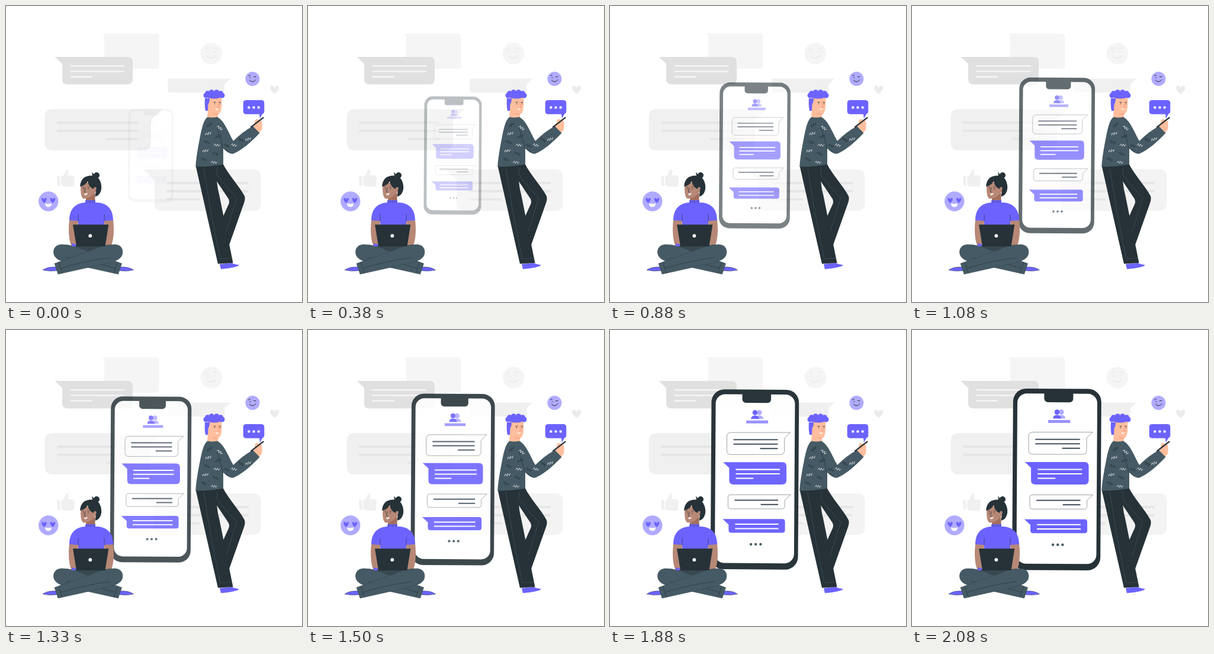
These frames come from a looping animation (500x500 px, 2120 ms). An HTML page:

```html
<!DOCTYPE html>
<html lang="en">
<head>
<meta charset="utf-8">
<title>Chat</title>
<style>
  html, body { margin: 0; width: 100%; height: 100%; overflow: hidden; background: #fff; }
  svg { display: block; width: 100vw; height: 100vh; }
  .line { fill: none; stroke: #263238; stroke-linecap: round; stroke-linejoin: round; }
  .dots { fill: none; stroke-linecap: round; stroke-dasharray: 0 8.2; stroke-width: 4.4; }
  .dark { fill: #263238; }
  .slate { fill: #455a64; }
  .purple { fill: #6c63ff; }
  .lilac { fill: #b0abff; }
  .skin { fill: #ffbe9d; }
  .brown { fill: #b78876; }
</style>
</head>
<body>
<svg viewBox="0 0 500 500">
  <defs>
    <path id="heart" d="M0 5C-5 1-6-4-3-5Q-1-5 0-2Q1-5 3-5C6-4 5 1 0 5Z"/>
    <g id="person">
      <circle cx="245" cy="138.600" r="4.300"/>
      <path d="M238 149.500Q238.500 143.500 245 143.500T252 149.500Z"/>
    </g>
    <g id="half-torso">
      <path class="brown" d="M107 361C105 378 106 397 111 406H120L122 361Z"/>
      <path class="purple" d="M145 332H134C117 333 107 343 107 362L122 363V372H145Z"/>
      <path class="line" stroke-width=".6" d="M122 363V352"/>
    </g>
    <g id="leg">
      <path class="purple" stroke="#263238" stroke-width=".5" d="M62 446Q70 440 86 441V447Q74 449 62 446Z"/>
      <path class="slate" stroke="#37474f" stroke-width=".6" d="M146 412Q165 403 183 403C195 403 199 412 196 421C192 430 178 433 160 437L88 453L82 435Z"/>
      <path class="line" stroke-width=".6" d="M89 433L95 451M93 443Q135 430 176 425"/>
    </g>
  </defs>

  <g id="backdrop">
    <circle cx="347" cy="80.300" r="18.300" fill="#f5f5f5"/>
    <path class="line" style="stroke:#e6e6e6" stroke-width="1.200" d="M339.500 85q7.500 6.500 15-1M336.500 73q2-2 4-1.500M351 71.500q3-1 5 1M340.500 76.500v2M352 76.500v2"/>
    <use href="#heart" transform="translate(453.700 141.500) scale(1.600 1.400)" fill="#ebebeb"/>
    <path fill="#f0f0f0" d="M86 287H91L92 303.500H87ZM93 288C98 287 99 282 101 277Q105 274 105.500 279L104.500 286H113Q117 288 115.500 296Q116 305 112 305.500L98 305L93.500 303Z"/>
  </g>

  <g id="phone">
    <g transform="rotate(.35 244.500 252.500)">
      <rect class="dark" x="170" y="99.300" width="149" height="306.400" rx="22"/>
      <rect x="177.200" y="107.500" width="135" height="287.500" rx="16" fill="#fff"/>
      <rect class="dark" x="222.500" y="102" width="49" height="20" rx="6"/>
    </g>
    <use href="#person" x="7.300" class="lilac"/>
    <use href="#person" class="purple"/>
    <rect x="230" y="152" width="37.300" height="5" fill="#9993ff"/>
    <path class="dots" stroke="#455a64" d="M238 362.800h17"/>
  </g>

  <g id="emojis">
    <circle cx="416.400" cy="123" r="12" class="lilac"/>
    <path class="line" stroke-width="1" d="M411.500 125.500Q417 131 422 124.500M409.500 118q1.500-1.500 3-1M418.500 119.500h3.500M412.500 120.500v1"/>
    <circle cx="71.700" cy="330" r="16.700" class="lilac"/>
    <use href="#heart" transform="translate(64.500 328.500) scale(.9)" class="purple"/>
    <use href="#heart" transform="translate(79 328.500) scale(.9)" class="purple"/>
    <path fill="#fff" d="M66 333.500Q71.500 335 77 333.500Q77 339.500 71.500 339.500T66 333.500Z"/>
  </g>

  <g id="woman">
    <use href="#half-torso"/>
    <use href="#half-torso" transform="translate(288) scale(-1 1)"/>
    <path fill="#a46f5e" d="M135 316H150.500V330H135Z"/>
    <path class="brown" d="M127 298C125 308 126 324 131 325.500Q143 326 152 313V298Z"/>
    <circle class="dark" cx="153" cy="286" r="5"/>
    <path class="dark" d="M125 305C126 292 133 286 146 286.500L145 280.500L150 286C161 291 163 307 160 313Q158 320 150.500 322L152.500 307Q150 303 147.500 309Q140 306 138 296Q133 304 125 305Z"/>
    <path class="line" stroke-width=".8" d="M129.500 306h2M138 306h2.500M131 308.500v1M139 308.500v1M134 307L132.500 314H134"/>
    <path fill="#fff" d="M132 317Q135.500 317.500 138 315.500Q137 320 133 319.500Z"/>
    <path class="purple" d="M134 328H151V333H134Z"/>
    <path d="M136 330.500H151" stroke="#263238" stroke-width="4" stroke-dasharray=".5 2.500"/>
    <path fill="#37474f" d="M114 404H173L164 420H122Z"/>
    <use href="#leg" transform="translate(277.500) scale(-1 1)"/>
    <use href="#leg"/>
    <path class="purple" d="M111 401L118 402.500V406H111Z"/>
    <path class="dark" d="M113 369.300H173.300L167.500 406H119Z"/>
    <circle cx="142.300" cy="388.200" r="2.900" fill="#fff"/>
  </g>

  <g id="man">
    <path class="purple" d="M361 436L381 434Q387 437 394 437.500Q390 442 363 444.500Z"/>
    <path class="dark" d="M338 268L366.500 266.500C375 284 394 304 403 321Q404.500 326 402 333L376.500 405L366 357L376.500 334Q378 330 376 326L356 296Z"/>
    <path class="dark" d="M320.500 270L351 269C357 285 355 300 360 318L383.500 434L358 435.500Z"/>
    <path class="line" style="stroke:#455a64" stroke-width=".6" d="M334 274Q345 350 362 427L381 426M357 273L356 285Q375 310 390 324L372 380"/>
    <path class="skin" d="M341 170H358V190Q348 194 340 189Z"/>
    <path class="skin" d="M341 155H364C365 168 364 180 359 182.500Q348 184 341 172Z"/>
    <path class="purple" d="M336 156H344Q344 163 341.500 166L341 177H337Q335 168 336 156Z"/>
    <g id="curls" class="purple"><ellipse cx="351.500" cy="151" rx="14" ry="5.500"/></g>
    <path class="line" stroke-width=".9" d="M351 162.500h3M360 162.500h2.500M352.500 164.500v1M361.500 164.500v1"/>
    <path class="line" style="stroke:#eb9481" stroke-width=".9" d="M358 163L360 171H357.500M350 181.500Q354 183.500 358 182.500"/>
    <path fill="#fff" d="M353 173Q357 174.500 359.500 173Q357 178 353 173Z"/>
    <path class="skin" d="M416 205L420 198Q420 191 424 191L432 194Q433.500 205 431.500 210L426 215Z"/>
    <path class="slate" d="M340.500 187.500C334 192 331 205 328 220C324 240 321 258 320.300 271.500Q344 272 367 267.500V240Q376 251 384 249.500C398 244 415 229 428.500 214.500L417 203Q400 212 384 228C376 214 368 192 356.500 187.500Q348 189.500 340.500 187.500Z"/>
    <path class="line" stroke-width=".7" d="M356 205Q363 224 366 240L376 246"/>
    <path class="line" stroke-width="2.300" d="M414 204.300L434.500 188.600"/>
  </g>

  <path class="purple" d="M406 159H431Q436.300 159 436.300 164V178Q436.300 181 433 182.500L429 190L428 182.700H406Q400.700 182.700 400.700 178V164Q400.700 159 406 159Z"/>
  <path class="dots" stroke="#fff" d="M410.300 171.400h17"/>
</svg>
<script>
const NS = 'http://www.w3.org/2000/svg';
const LOOP = 2120, STEPS = 51, STEP_MS = 1000 / 24;
const DARK = '#263238', PURPLE = '#6c63ff';
const byId = id => document.getElementById(id);
const phone = byId('phone'), backdrop = byId('backdrop'), man = byId('man');

function add(parent, tag, attrs) {
  const el = document.createElementNS(NS, tag);
  for (const key in attrs) el.setAttribute(key, attrs[key]);
  parent.append(el);
}

// Tail, corners and text rows all follow from the size; side is -1 for a tail on the left.
function bubble(parent, x, y, w, h, side, rows, paint, ink) {
  const dir = Math.sign(side), tail = side * w * .105;
  const r = h * (rows ? .19 : .09), k = dir * r;
  const near = dir > 0 ? x + w : x, far = dir > 0 ? x : x + w;
  add(parent, 'path', {
    d: `M${near + tail} ${y}H${far + k}q${-k} 0 ${-k} ${r}V${y + h - r}q0 ${r} ${k} ${r}` +
       `H${near - k}q${k} 0 ${k} ${-r}V${y + Math.abs(tail) * .95}Z`,
    ...paint
  });

  const length = w * .77, gap = w * .077;
  const left = x + (w - length) / 2, middle = y + h / 2 + w * .01;
  for (let i = 0; i < rows; i++) {
    const short = i > 0 && i === rows - 1 && ink.short !== false;
    const size = short ? length * .4 : length;
    const from = short && dir > 0 ? left + length - size : left;
    add(parent, 'path', {
      d: `M${from} ${middle + (i - (rows - 1) / 2) * gap}h${size}`,
      stroke: ink.color, 'stroke-width': w * .0215
    });
  }
}

const gray = level => ({ fill: `rgb(${level},${level},${level})` });
const grayInk = level => ({ color: gray(level).fill });
bubble(backdrop, 166, 46.5, 92.5, 59.5, -.4, 0, gray(245));
bubble(backdrop, 95, 86, 119, 46.5, -1, 3, gray(224), grayInk(245));
bubble(backdrop, 273.5, 122.7, 95.5, 23.5, 1, 0, gray(240));
bubble(backdrop, 65.5, 174.3, 179.5, 69.5, 1, 3, gray(240), grayInk(230));
bubble(backdrop, 251, 276, 179.5, 70, -1, 3, gray(243), grayInk(230));

const outline = { fill: '#fff', stroke: DARK, 'stroke-width': .45 };
const solid = { fill: PURPLE };
bubble(phone, 197, 172.5, 98, 37.5, 1, 3, outline, { color: '#455060' });
bubble(phone, 201, 223, 97.5, 38, -1, 3, solid, { color: '#fff' });
bubble(phone, 199, 278.5, 96.5, 24, 1, 2, outline, { color: '#455060' });
bubble(phone, 200, 319.7, 96, 23.5, -1, 2, solid, { color: '#fff', short: false });

for (let i = 0; i <= 5; i++) {
  const a = Math.PI * (1 + i / 5);
  add(byId('curls'), 'circle', { cx: 351.5 + 13.5 * Math.cos(a), cy: 151 + 5.5 * Math.sin(a), r: 4.5 });
}

// Knitted zigzags: two columns down the jumper, then a row along the sleeve.
let seed = 7;
const random = () => (seed = seed * 16807 % 2147483647) / 2147483647;
function zigzag(x, y, light) {
  add(man, 'path', {
    class: 'line', d: 'M-5 1l2-3 2 4 2-4 2 4 2-3', 'stroke-width': .8,
    style: light ? 'stroke:#e6eaec' : '',
    transform: `translate(${x} ${y}) rotate(${random() * 80 - 40})`
  });
}
for (let row = 0; row < 5; row++)
  for (let col = 0; col < 2; col++)
    zigzag(344 - 2.4 * row + 17 * col, 201 + 14.5 * row + 5 * col, (row + col) % 2);
for (let i = 0; i < 4; i++) zigzag(373 + 12 * i, 236 - 5 * i + i % 2 * 4, i % 2);

// cubic-bezier(0, 0, .58, 1), inverted by bisection
function easeOut(x) {
  let lo = 0, hi = 1;
  for (let i = 0; i < 24; i++) {
    const u = (lo + hi) / 2;
    if (1.74 * u * u - .74 * u ** 3 < x) lo = u; else hi = u;
  }
  return lo * lo * (3 - 2 * lo);
}

function draw(ms) {
  const tick = Math.floor((ms % LOOP + 5) / STEP_MS);
  const step = tick < 2 ? 0 : Math.min(tick, STEPS - 1);
  const p = easeOut((step + 1) / STEPS);
  phone.setAttribute('transform', `translate(244.5 252.5) scale(${.5 + p / 2}) translate(-244.5 -252.5)`);
  phone.setAttribute('opacity', p);
}

const start = performance.now();
function frame() {
  draw(performance.now() - start);
  requestAnimationFrame(frame);
}
frame();
</script>
</body>
</html>
```
